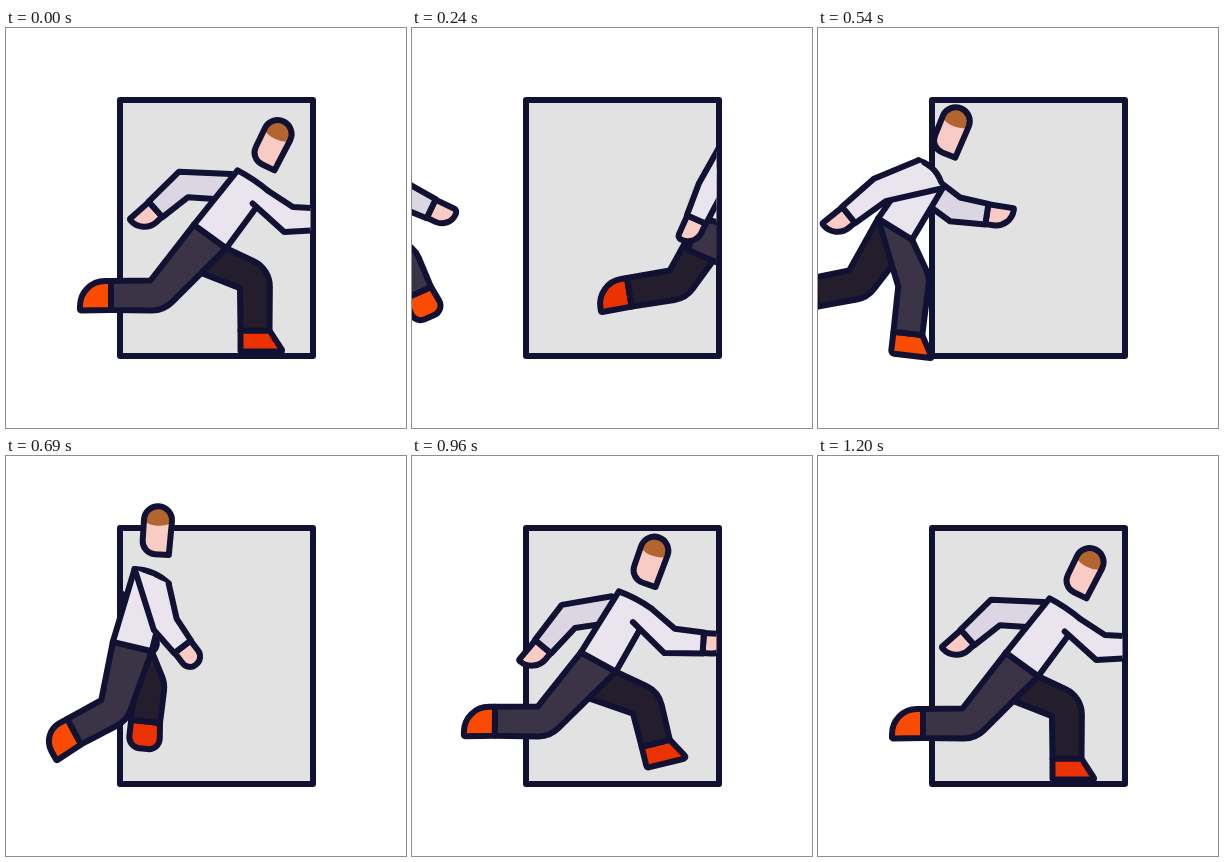
An HTML page with a canvas for the animation above (1.26 s loop, 400 by 400 pixels).

```html
<!DOCTYPE html>
<html lang="en">
<head>
<meta charset="utf-8">
<title>Runner through a door</title>
<style>
html, body { margin: 0; width: 100%; height: 100%; overflow: hidden; background: #fff; }
canvas { display: block; width: 400px; height: 400px; }
</style>
</head>
<body>
<canvas id="stage" width="400" height="400"></canvas>
<script>
const ctx = document.getElementById('stage').getContext('2d');
const LOOP = 1260, STEP = 30, RUN = 1200, STRIDE = 350, DOOR_EDGE = 304.5;
const TAU = Math.PI * 2, DEG = Math.PI / 180;
const COLORS = {
  ink: '#111233', door: '#e2e2e2', shirt: '#e9e4ee', sleeve: '#dcd6e3',
  skin: '#f8cbc5', hair: '#b3652f',
  nearLeg: '#3b3447', farLeg: '#241d2b', nearShoe: '#fa4b02', farShoe: '#ea3300'
};

// Shoe shapes: length, toe reach, heel radius, toe radius.
const FLAT = [21, 28, 1, 1], POINTED = [31, 15, 25, 1], ROUND = [28, 16, 12, 12];

// Evenly spaced poses of one limb over a full stride: middle joint x, y, end joint x, y.
// Legs are measured from the waist, arms from the collar.
const LEG_CYCLE = [
  [-53, 59, -99, 59], [-33, 54, -74, 64], [19, 42, 17, 75], [43, 41, 60, 70],
  [45, 42, 45, 94], [15, 54, 7, 104], [-20, 64, -61, 84], [-50, 60, -100, 63]
];
const ARM_CYCLE = [
  [51, 49, 87, 49], [47, 52, 77, 58], [20, 45, 20, 65], [-28, 42, -48, 76],
  [-42, 17, -70, 42], [-35, 32, -64, 57], [33, 56, 52, 78], [48, 51, 77, 58]
];

const clamp = (v, lo = 0, hi = 1) => Math.max(lo, Math.min(hi, v));
const along = (p, d, s) => [p[0] + d[0] * s, p[1] + d[1] * s];
const mix = (a, b, u) => a.map((v, i) => v + (b[i] - v) * u);
const polar = angle => [Math.cos(angle), Math.sin(angle)];
const front = d => [d[1], -d[0]];
const dot = (a, b) => a[0] * b[0] + a[1] * b[1];
function direction(a, b) {
  const x = b[0] - a[0], y = b[1] - a[1], size = Math.hypot(x, y) || 1;
  return [x / size, y / size];
}
function miter(d1, d2) {
  const a = front(d1), b = front(d2), k = 1 / Math.max(0.4, 1 + dot(a, b));
  return [(a[0] + b[0]) * k, (a[1] + b[1]) * k];
}

// Smooth cyclic spline through the poses; returns both joints placed at the origin point.
function limb(cycle, phase, origin) {
  const n = cycle.length, s = (phase % 1) * n, i = Math.floor(s), u = s - i;
  const [a, b, c, d] = [i + n - 1, i, i + 1, i + 2].map(k => cycle[k % n]);
  const v = b.map((p, j) => p + u / 2 * (c[j] - a[j]
    + u * (2 * a[j] - 5 * p + 4 * c[j] - d[j] + u * (3 * (p - c[j]) + d[j] - a[j]))));
  return [[origin[0] + v[0], origin[1] + v[1]], [origin[0] + v[2], origin[1] + v[3]]];
}

function makeBody(u) {
  const travel = 1 - (1 - u) ** 2 * (1 + 0.6 * u - 0.35 * u * u);
  const phase = travel + 0.035 * Math.sin(TAU * travel);
  const sway = Math.cos(2 * TAU * phase - 25 * DEG);
  const swing = Math.cos(TAU * phase);
  const lean = (27.5 + 12.5 * sway) * DEG;
  const waist = [STRIDE * travel - 146, 199.5 + 9 * Math.cos(2 * TAU * phase)];
  const belt = polar(lean - 3 * DEG);
  const waistBack = along(waist, belt, -20), waistFront = along(waist, belt, 20);
  const collar = along(waistBack, polar(lean - TAU / 4), 73 - 3.5 * sway);
  const chest = along(collar, polar(lean + (6 - 11 * swing) * DEG), 37);
  const armpit = along(collar, [0.42, 0.92], 36 * Math.max(0, swing));
  return { phase, swing, lean, waist, waistBack, waistFront, collar, chest, armpit };
}

// Points may carry a corner radius as a third value.
function shape(points, fill, closed = true) {
  ctx.beginPath();
  points.forEach(([x, y, radius], i) => {
    if (!i) ctx.moveTo(x, y);
    else if (radius > 0) ctx.arcTo(x, y, points[i + 1][0], points[i + 1][1], radius);
    else ctx.lineTo(x, y);
  });
  if (closed) ctx.closePath();
  ctx.fillStyle = fill;
  ctx.fill();
  ctx.stroke();
}

function drawShoe(ankle, dir, phase, color) {
  const lifted = clamp(Math.atan2(-dir[0], dir[1]) / (75 * DEG));
  const passing = Math.max(0, Math.cos(TAU * (phase - 0.28))) ** 4;
  const [length, reach, heel, toe] = mix(mix(FLAT, POINTED, lifted), ROUND, passing);
  const n = front(dir), end = along(ankle, dir, length);
  shape([
    along(ankle, n, -14.5), [...along(end, n, -14.5), heel],
    [...along(end, n, reach), toe], along(ankle, n, 14.5)
  ], color);
}

function drawLeg(body, phase, side) {
  const { waist, waistBack, waistFront, collar } = body;
  const [knee, ankle] = limb(LEG_CYCLE, phase, waist);
  const spine = direction(collar, waistBack), hip = along(waist, spine, 20);
  const thigh = direction(hip, knee), shin = direction(knee, ankle);
  const bend = miter(thigh, shin), n = front(shin), kneeBack = along(knee, bend, -15);
  const raised = clamp(((knee[0] - waist[0]) / (knee[1] - waist[1]) - 0.5) / 0.4);
  const raisedSeat = along(along(hip, front(thigh), -19), thigh, -18);
  drawShoe(ankle, shin, phase, COLORS[side + 'Shoe']);
  shape([
    waistBack, mix(mix(waistBack, kneeBack, 0.3), raisedSeat, raised), kneeBack,
    along(ankle, n, -14.5), along(ankle, n, 14.5),
    [...along(knee, bend, 15), 28], waistFront
  ], COLORS[side + 'Leg']);
}

function drawHand(wrist, dir, phase) {
  const lean = clamp(1.4 * Math.cos(TAU * phase), -1, 1);
  const n = front(dir), end = along(wrist, dir, 22 + 4 * Math.abs(lean));
  shape([
    along(wrist, n, 10), [...along(end, n, 10), 9.5 - 8.5 * lean],
    [...along(end, n, -10), 9.5 + 8.5 * lean], along(wrist, n, -10)
  ], COLORS.skin);
}

function drawArm(backStart, frontStart, [elbow, wrist], phase, color) {
  const upper = direction(mix(backStart, frontStart, 0.5), elbow);
  const lower = direction(elbow, wrist), bend = miter(upper, lower), n = front(lower);
  drawHand(wrist, lower, phase);
  shape([
    backStart, along(elbow, bend, -12.5), along(wrist, n, -10.5),
    along(wrist, n, 10.5), along(elbow, bend, 12.5), frontStart
  ], color, false);
}

function drawFarArm({ collar, waist, phase }) {
  const turn = phase + 0.5;
  const joints = limb(ARM_CYCLE, turn, along(collar, [-12, -3], 1));
  const shoulder = mix(collar, waist, 0.25);
  const n = front(direction(shoulder, joints[0]));
  drawArm(along(shoulder, n, -13), along(shoulder, n, 13), joints, turn, COLORS.sleeve);
}

function drawTorso({ collar, chest, waistBack, waistFront, swing }) {
  const n = front(direction(collar, chest));
  const bulge = along(mix(collar, chest, 0.5), n, 7 - 5 * swing);
  ctx.beginPath();
  // The front seam stops below the sleeve when the arm reaches forward.
  ctx.moveTo(...mix(chest, waistFront, 0.3 * Math.max(0, swing)));
  for (const p of [waistFront, waistBack, collar]) ctx.lineTo(...p);
  ctx.quadraticCurveTo(...bulge, ...chest);
  ctx.fillStyle = COLORS.shirt;
  ctx.fill();
  ctx.stroke();
}

function drawHead({ collar, lean }) {
  ctx.save();
  ctx.translate(...along(collar, polar(lean + 9 * DEG - TAU / 4), 54));
  ctx.rotate(lean - 13 * DEG);
  const outline = new Path2D();
  outline.arc(0, 0, 14, Math.PI, 0);
  outline.lineTo(13, 34);
  outline.arcTo(-14, 34, -14, 0, 13);
  outline.closePath();
  ctx.fillStyle = COLORS.skin;
  ctx.fill(outline);
  ctx.save();
  ctx.clip(outline);
  ctx.beginPath();
  ctx.ellipse(0, -7, 19, 12.5, 0, 0, TAU);
  ctx.fillStyle = COLORS.hair;
  ctx.fill();
  ctx.restore();
  ctx.stroke(outline);
  ctx.restore();
}

function drawRunner(body, offset) {
  const { phase, armpit, chest, collar } = body;
  ctx.save();
  ctx.translate(offset, 0);
  drawFarArm(body);
  drawLeg(body, phase + 0.5, 'far');
  drawLeg(body, phase, 'near');
  drawTorso(body);
  drawArm(armpit, chest, limb(ARM_CYCLE, phase, collar), phase, COLORS.shirt);
  drawHead(body);
  ctx.restore();
}

function drawScene(time) {
  const body = makeBody(time / RUN);
  ctx.fillStyle = '#fff';
  ctx.fillRect(0, 0, 400, 400);
  ctx.lineWidth = 6;
  ctx.lineJoin = ctx.lineCap = 'round';
  ctx.strokeStyle = COLORS.ink;
  ctx.fillStyle = COLORS.door;
  ctx.fillRect(114, 72, 193, 256);
  ctx.strokeRect(114, 72, 193, 256);
  ctx.save();
  ctx.beginPath();
  ctx.rect(0, 0, DOOR_EDGE, 400);
  ctx.clip();
  drawRunner(body, STRIDE);
  drawRunner(body, 0);
  ctx.restore();
}

function tick() {
  const time = performance.now() % LOOP;
  drawScene(Math.min(RUN, Math.floor(time / STEP) * STEP));
  requestAnimationFrame(tick);
}
tick();
</script>
</body>
</html>
```
